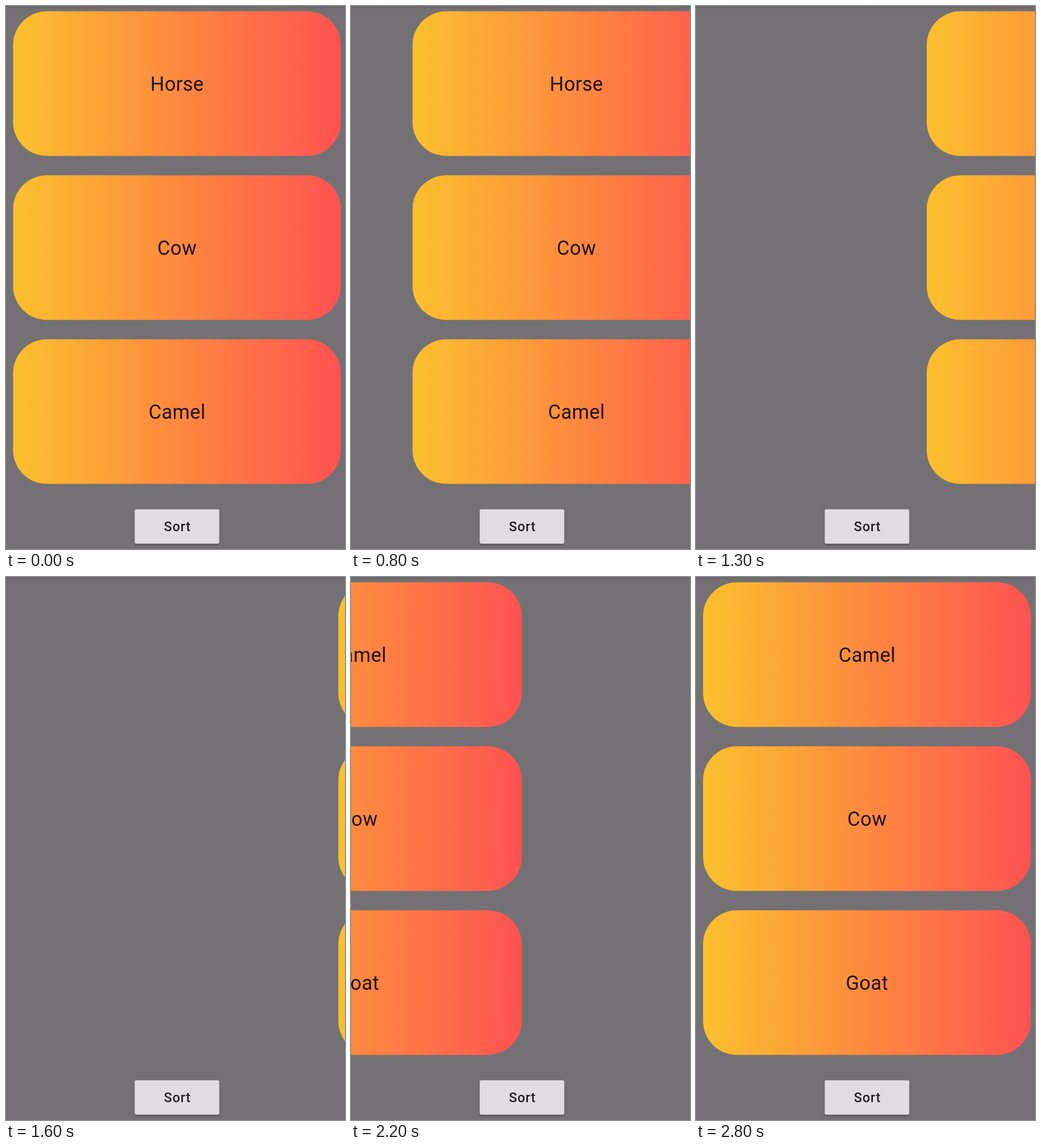
Animation of 592x947 px, one loop 2.9 s. Source, as an HTML page:

```html
<!DOCTYPE html>
<html lang="en">
<head>
<meta charset="utf-8">
<title>Sort cards</title>
<style>
  html, body { margin: 0; width: 100%; height: 100%; overflow: hidden; background: #737174; }
  svg { display: block; width: 592px; height: 947px; }
  text { font-family: Roboto, sans-serif; text-anchor: middle; }
  .label { font-size: 34.4px; letter-spacing: .3px; fill: rgba(0, 0, 0, .87); }
  .caption { font-size: 23.3px; font-weight: 500; letter-spacing: .8px; fill: #222123; }
  .button { fill: #dfdde0; filter: drop-shadow(0 2px 1.5px rgba(0, 0, 0, .32)); }
</style>
</head>
<body>
<svg viewBox="0 0 592 947">
  <defs>
    <linearGradient id="warm">
      <stop offset="0" stop-color="#fbc02d"/>
      <stop offset="1" stop-color="#ff5252"/>
    </linearGradient>
    <linearGradient id="shade" x2="0" y2="1">
      <stop offset="0" stop-color="#000" stop-opacity=".09"/>
      <stop offset="1" stop-color="#000" stop-opacity="0"/>
    </linearGradient>
  </defs>
  <rect width="592" height="947" fill="#737174"/>
  <rect width="592" height="7" fill="url(#shade)"/>
  <g id="list"></g>
  <rect class="button" x="224.7" y="877.7" width="147.8" height="60" rx="3"/>
  <text class="caption" x="299.3" y="916.3">Sort</text>
</svg>
<script>
  const LOOP = 2900, STEP = 100, SWAP = 1660, PITCH = 286;
  const before = ['Horse', 'Cow', 'Camel'];
  const after = ['Camel', 'Cow', 'Goat'];

  // [time in ms, horizontal offset in px]
  const slide = [
    [700, 0], [800, 95], [1000, 213], [1600, 568], [1640, 592],
    [1660, 592], [1660, -592], [1690, -587],
    [2000, -403], [2400, -170], [2690, 0], [LOOP, 0]
  ];

  const list = document.getElementById('list');

  function add(tag, attrs) {
    const el = document.createElementNS('http://www.w3.org/2000/svg', tag);
    for (const key in attrs) el.setAttribute(key, attrs[key]);
    return list.appendChild(el);
  }

  const labels = before.map((name, i) => {
    const y = 9.2 + i * PITCH;
    add('rect', { x: 12.4, y, width: 572.4, height: 252.3, rx: 59, fill: 'url(#warm)' });
    return add('text', { class: 'label', x: 298.7, y: y + 138.8 });
  });

  function offsetAt(t) {
    if (t <= slide[0][0]) return 0;
    const i = slide.findIndex(([time]) => time >= t);
    const [t0, x0] = slide[i - 1], [t1, x1] = slide[i];
    return x0 + (x1 - x0) * (t - t0) / (t1 - t0);
  }

  function draw() {
    const t = Math.floor(performance.now() % LOOP / STEP) * STEP;
    const names = t < SWAP ? before : after;
    labels.forEach((label, i) => { label.textContent = names[i]; });
    list.setAttribute('transform', `translate(${offsetAt(t)} 0)`);
    requestAnimationFrame(draw);
  }
  draw();
</script>
</body>
</html>
```
